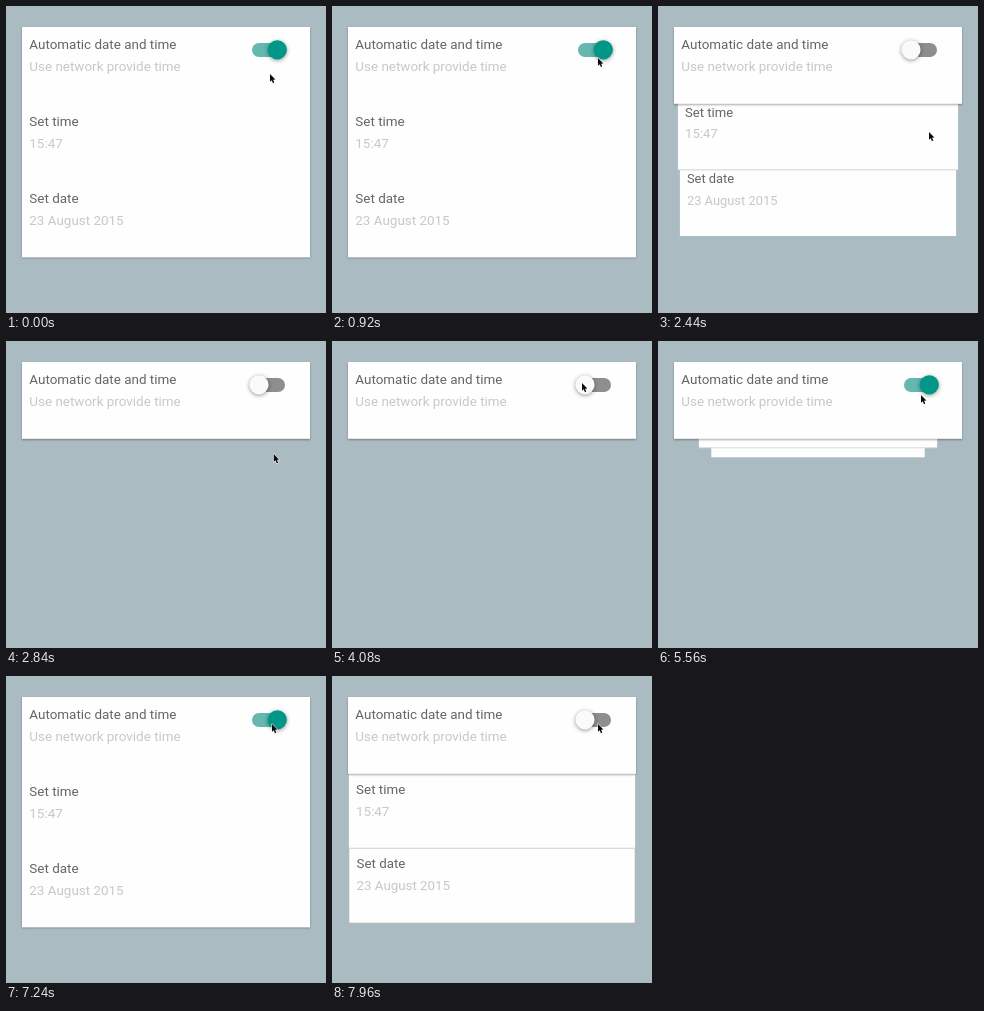
Write an HTML page with a canvas that moves like this. It is 320 px wide and 307 px high and loops after 8 s.

```html
<!DOCTYPE html>
<html lang="en">
<head>
<meta charset="utf-8">
<title>Date and time settings</title>
<style>
  html, body { margin: 0; width: 100%; height: 100%; overflow: hidden; background: #abbbc2; }
  canvas { display: block; width: 320px; height: 307px; }
</style>
</head>
<body>
<canvas id="stage"></canvas>
<script>
const W = 320, H = 307, LOOP = 8000;
const canvas = document.getElementById('stage');
const ctx = canvas.getContext('2d');
const dpr = window.devicePixelRatio || 1;
canvas.width = W * dpr;
canvas.height = H * dpr;

const CARD = { x: 16, y: 21, w: 288, h: 76.8 };
// shift and shrink describe how far a card tucks behind the first one
const cards = [
  { title: 'Automatic date and time', note: 'Use network provide time', shift: 0, shrink: 0 },
  { title: 'Set time', note: '15:47', shift: 70.8, shrink: 0.2 },
  { title: 'Set date', note: '23 August 2015', shift: 145, shrink: 0.3 }
];

// each tap flips the switch; the cards follow after a delay
const TAPS = [1705, 4825, 7282];
const SWITCH_MS = 300, FOLD_DELAY = 615, FOLD_MS = 600;

// pointer start, then moves: start, end, x, y
const POINTER_START = [264, 68];
const pointerMoves = [
  [0, 320, 269, 87], [320, 1200, 265, 41], [2000, 2440, 271, 126],
  [2440, 4060, 250, 42], [5100, 5560, 263, 54], [5560, 6160, 266, 48]
];

const clamp = v => Math.max(0, Math.min(1, v));
const mix = (a, b, k) => a + (b - a) * k;
const smooth = k => k * k * (3 - 2 * k);
const mixColor = (a, b, k) => `rgb(${a.map((v, i) => Math.round(mix(v, b[i], k))).join(',')})`;

// cubic-bezier(.4, 0, .2, 1)
function ease(x) {
  if (x <= 0 || x >= 1) return clamp(x);
  let lo = 0, hi = 1;
  for (let i = 0; i < 24; i++) {
    const s = (lo + hi) / 2, r = 1 - s;
    if (1.2 * r * r * s + 0.6 * r * s * s + s * s * s < x) lo = s; else hi = s;
  }
  return smooth(lo);
}

// goes 0 to 1 and back with alternate taps
function toggled(t, delay, duration) {
  return TAPS.reduce((level, tap, i) =>
    level + (i % 2 ? -1 : 1) * ease((t - tap - delay) / duration), 0);
}

function pointerAt(t) {
  let [x, y] = POINTER_START;
  for (const [start, end, toX, toY] of pointerMoves) {
    const k = smooth(clamp((t - start) / (end - start)));
    x = mix(x, toX, k);
    y = mix(y, toY, k);
  }
  return [x, y];
}

function setShadow(alpha, blur, dy) {
  ctx.shadowColor = `rgba(0,0,0,${alpha})`;
  ctx.shadowBlur = blur * dpr;
  ctx.shadowOffsetY = dy * dpr;
}

function drawPanel(x, y, w, h, raised) {
  ctx.save();
  if (raised) setShadow(0.32, 2, 1);
  ctx.fillStyle = '#fefefe';
  ctx.fillRect(x, y, w, h);
  ctx.restore();
}

function drawCard(index, fold) {
  const card = cards[index];
  const scale = 1 - card.shrink * fold;
  const middle = CARD.y + (index + 0.5) * CARD.h - card.shift * fold;
  ctx.save();
  ctx.translate(W / 2, middle);
  ctx.scale(scale, scale);
  ctx.translate(-CARD.w / 2, -CARD.h / 2);
  if (fold > 0) {
    drawPanel(0, 0, CARD.w, CARD.h, index === 0);
    if (index === 1) {
      ctx.fillStyle = '#cdd1d3';
      ctx.fillRect(0, CARD.h - 0.5, CARD.w, 1);
    }
  }
  ctx.font = '13.45px Roboto, sans-serif';
  ctx.fillStyle = '#656565';
  ctx.fillText(card.title, 7.3, 22);
  ctx.fillStyle = '#c8c8c8';
  ctx.fillText(card.note, 7.3, 44);
  ctx.restore();
}

function drawSwitch(off) {
  ctx.fillStyle = mixColor([100, 184, 175], [142, 142, 142], off);
  ctx.beginPath();
  ctx.roundRect(246, 37, 33, 14, 7);
  ctx.fill();
  ctx.save();
  setShadow(0.42, 4, 1);
  ctx.fillStyle = mixColor([0, 150, 136], [250, 250, 250], off);
  ctx.beginPath();
  ctx.arc(mix(271.3, 253, off), 43.8, 9.6, 0, Math.PI * 2);
  ctx.fill();
  ctx.restore();
}

function drawPointer(x, y) {
  ctx.save();
  ctx.translate(x, y);
  ctx.scale(0.9, 0.9);
  ctx.beginPath();
  ctx.moveTo(0, 0);
  for (const [px, py] of [[0, 8.6], [1.9, 6.9], [3.3, 10.2], [4.8, 9.5], [3.4, 6.4], [6, 6.2]]) {
    ctx.lineTo(px, py);
  }
  ctx.closePath();
  ctx.strokeStyle = 'rgba(255,255,255,.8)';
  ctx.lineWidth = 1.3;
  ctx.lineJoin = 'round';
  ctx.stroke();
  ctx.fillStyle = '#0a0a0a';
  ctx.fill();
  ctx.restore();
}

function draw(t) {
  const fold = toggled(t, FOLD_DELAY, FOLD_MS);
  ctx.setTransform(dpr, 0, 0, dpr, 0, 0);
  ctx.fillStyle = '#abbbc2';
  ctx.fillRect(0, 0, W, H);
  // unfolded cards form one seamless sheet
  if (fold === 0) drawPanel(CARD.x, CARD.y, CARD.w, CARD.h * 3, true);
  for (let i = cards.length - 1; i >= 0; i--) drawCard(i, fold);
  drawSwitch(toggled(t, 0, SWITCH_MS));
  drawPointer(...pointerAt(t));
}

const begin = performance.now();
function tick() {
  draw((performance.now() - begin) % LOOP);
  requestAnimationFrame(tick);
}
tick();
</script>
</body>
</html>
```
